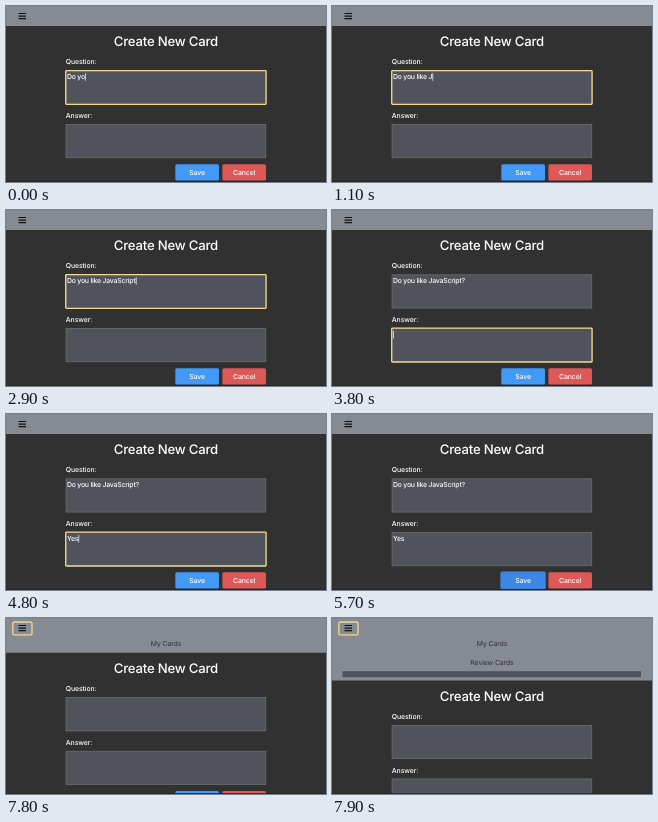
Recreate the animation shown at these times as an HTML page. Size 320x176 px, loop 8 s.

```html
<!DOCTYPE html>
<html lang="en">
<head>
<meta charset="utf-8">
<title>Create New Card</title>
<style>
html, body { margin: 0; width: 100%; height: 100%; overflow: hidden; background: #313131; }
svg { display: block; width: 320px; height: 176px; }
text { font: 500 6.9px Inter, "Open Sans", sans-serif; letter-spacing: -.2px; fill: #fff; white-space: pre; text-rendering: geometricPrecision; }
.title { font-size: 13.2px; letter-spacing: -.22px; }
.label { font-size: 6.9px; letter-spacing: -.1px; }
.mid { text-anchor: middle; }
.button { font-size: 6.9px; letter-spacing: -.06px; }
.link { font-weight: 400; letter-spacing: -.1px; fill: #303338; }
.box { fill: #50535b; stroke: #77797c; stroke-width: .6; }
.focus { fill: none; stroke: #f5d88e; stroke-width: 1.3; }
.caret { fill: #fff; }
</style>
</head>
<body>
<svg viewBox="0 0 320 176">
  <rect width="320" height="176" fill="#313131"/>
  <g id="page">
    <text class="title mid" x="159.9" y="40.3">Create New Card</text>
    <text class="label" x="59.8" y="58.1">Question:</text>
    <rect class="box" x="60" y="64.8" width="199.8" height="33.3"/>
    <text class="label" x="59.8" y="112">Answer:</text>
    <rect class="box" x="60" y="118.4" width="199.8" height="33.4"/>
    <rect class="focus" id="ring" x="59.7" width="200.4" height="33.8" rx=".8"/>
    <text id="question" x="60.9" y="73.4"></text>
    <text id="answer" x="60.9" y="127"></text>
    <rect class="caret" id="caret" width=".7" height="7.6"/>
    <rect id="glow" x="168.2" y="157.2" width="45.8" height="18.4" rx="2.4" fill="#4f8fe4"/>
    <rect x="169.3" y="158.2" width="43.7" height="16.4" rx="1.6" fill="#4299f8"/>
    <rect id="pressed" x="169.3" y="158.2" width="43.7" height="16.4" rx="1.6" fill="#3a7fdf"/>
    <text class="button mid" x="191.1" y="168.9">Save</text>
    <rect x="216.4" y="158.2" width="43.6" height="16.4" rx="1.6" fill="#df5858"/>
    <text class="button mid" x="238.2" y="168.9">Cancel</text>
  </g>
  <clipPath id="clip"><rect id="clipBox" width="320" height="20"/></clipPath>
  <g clip-path="url(#clip)">
    <rect width="320" height="176" fill="#858a93"/>
    <g id="menu">
      <text class="link mid" x="160" y="28.4">My Cards</text>
      <text class="link mid" x="160" y="46.5">Review Cards</text>
      <rect x="10.5" y="53.2" width="298.5" height="6" fill="#50535b"/>
    </g>
    <rect class="focus" id="menuRing" x="6.8" y="4" width="19.2" height="12.8" rx="1.6"/>
    <path d="M12.5 7.5h7.5M12.5 10.1h7.5M12.5 12.7h7.5" stroke="#111" stroke-width="1.2"/>
  </g>
  <rect y="175.2" width="320" height=".8" fill="#222"/>
</svg>
<script>
const LOOP = 8000;
const QUESTION = "Do you like JavaScript?";
const ANSWER = "Yes";

// [time, number of characters typed]
const questionKeys = [[0, 5], [100, 6], [200, 7], [500, 8], [600, 10], [700, 11], [800, 12],
  [1100, 13], [1200, 14], [1400, 15], [1600, 16], [1800, 17], [2000, 18],
  [2200, 19], [2300, 20], [2400, 21], [2900, 22], [3100, 23], [6200, 0]];
const answerKeys = [[0, 0], [4500, 1], [4600, 2], [4800, 3], [6200, 0]];
const focusKeys = [[0, "question"], [3800, "answer"], [5600, "save"], [7800, "menu"]];
const caretKeys = [[0, 1], [3600, 0], [3800, 1], [4300, 0], [4500, 1], [5300, 0]];
const headerKeys = [[0, 20], [7800, 34.8], [7900, 62.5]];

const el = id => document.getElementById(id);
const at = (keys, t) => keys.filter(k => k[0] <= t).pop()[1];
const show = (id, amount) => el(id).setAttribute("opacity", Number(amount));

function setText(id, value) {
  if (el(id).textContent !== value) el(id).textContent = value;
}

function render(t) {
  const focus = at(focusKeys, t);
  const header = at(headerKeys, t);
  const typing = focus === "question" || focus === "answer";

  setText("question", QUESTION.slice(0, at(questionKeys, t)));
  setText("answer", ANSWER.slice(0, at(answerKeys, t)));

  show("ring", typing);
  show("caret", typing && at(caretKeys, t));
  if (typing) {
    const field = el(focus);
    const width = field.textContent ? field.getComputedTextLength() : 0;
    el("ring").setAttribute("y", focus === "question" ? 64.6 : 118.2);
    el("caret").setAttribute("x", 61.1 + width);
    el("caret").setAttribute("y", focus === "question" ? 67.2 : 120.8);
  }

  const press = focus === "save" ? Math.min(1, (t - 5500) / 300) : 0;
  show("glow", press);
  show("pressed", press);

  el("page").setAttribute("transform", `translate(0 ${header - 20})`);
  el("clipBox").setAttribute("height", header);
  show("menu", focus === "menu");
  show("menuRing", focus === "menu");
}

function frame() {
  render(performance.now() % LOOP);
  requestAnimationFrame(frame);
}
frame();
</script>
</body>
</html>
```
